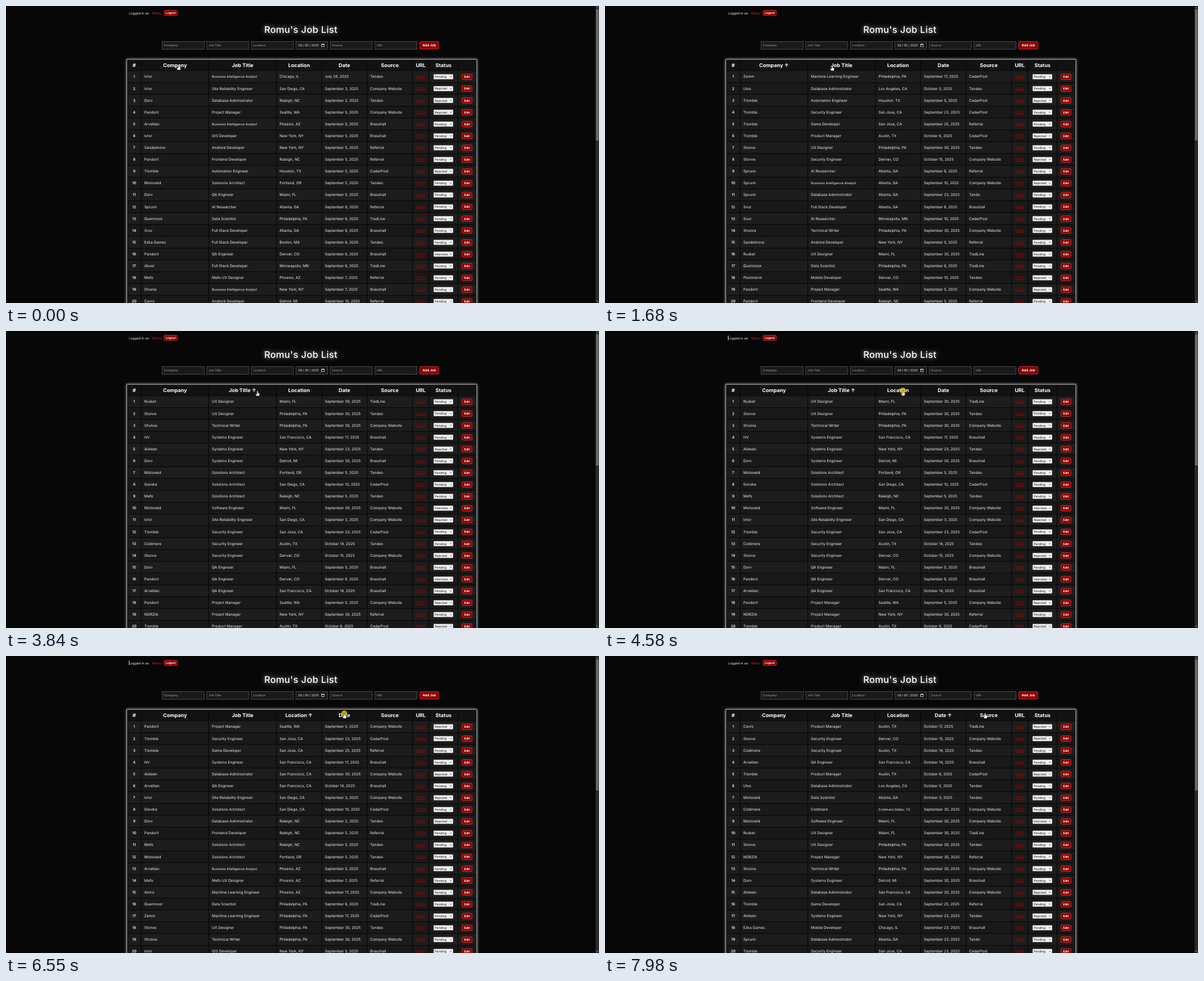
Recreate the animation shown at these times as an HTML page. Size 1057 by 530 pixels, loop 8000 ms.

```html
<!DOCTYPE html>
<html lang="en">
<head>
<title>Job List</title>
<style>
  html, body { margin: 0; width: 100%; height: 100%; overflow: hidden; background: #070707; }
  svg { display: block; width: 1057px; height: 530px; }
  text { font-family: Inter, sans-serif; text-rendering: geometricPrecision; fill: #f2f2f2; }
  .cell { font-size: 6.6px; }
  .num { font-size: 6.6px; font-weight: 600; }
  .small { font-size: 5.85px; }
  .head { font-size: 9.1px; font-weight: 700; fill: #fff; }
  .link { font-size: 6.9px; fill: #b80000; text-decoration: underline; }
  .state { font-size: 5.4px; fill: #111; }
  .btn { font-size: 5.3px; font-weight: 700; fill: #fff; }
  .hint { font-size: 5.5px; fill: #a0a0a0; }
  .title { font-size: 16.6px; font-weight: 500; letter-spacing: .3px; fill: #fff;
           filter: drop-shadow(0 0 4px rgba(255,255,255,.65)); }
  .glow { filter: drop-shadow(0 0 2px rgba(255,255,255,.7)); }
</style>
</head>
<body>
<svg id="stage" viewBox="0 0 1057 530"></svg>
<script>
const LOOP = 8000, ROWS = 20, PITCH = 21.1, FIRST = 126.1;
const EDGES = [216, 241, 361.5, 482, 562.7, 643.6, 724.6, 754, 805.6, 838.2];
const HEADS = ['#', 'Company', 'Job Title', 'Location', 'Date', 'Source', 'URL', 'Status', ''];
const MONTHS = { Jul: 'July', Sep: 'September', Oct: 'October' };
const STATES = { P: 'Pending', R: 'Rejected', I: 'Interview' };

const jobs = `Ivtor|Business Intelligence Analyst|Chicago, IL|Jul 28|Tandeo|P
Ivtor|Site Reliability Engineer|San Diego, CA|Sep 3|Company Website|R
Dorv|Database Administrator|Raleigh, NC|Sep 2|Tandeo|R
Pandoril|Project Manager|Seattle, WA|Sep 5|Company Website|R
Arvellian|Business Intelligence Analyst|Phoenix, AZ|Sep 5|Brasshall|P
Ivtor|iOS Developer|New York, NY|Sep 5|Brasshall|P
Sandelmore|Android Developer|New York, NY|Sep 5|Referral|P
Pandoril|Frontend Developer|Raleigh, NC|Sep 5|Referral|P
Tromble|Automation Engineer|Houston, TX|Sep 5|CedarPost|R
Mistoveld|Solutions Architect|Portland, OR|Sep 5|Tandeo|P
Dorv|QA Engineer|Miami, FL|Sep 5|Brasshall|P
Sprunn|AI Researcher|Atlanta, GA|Sep 6|Referral|P
Quenmoor|Data Scientist|Philadelphia, PA|Sep 6|TiedLine|P
Snur|Full Stack Developer|Atlanta, GA|Sep 6|Brasshall|P
Ezka Games|Full Stack Developer|Boston, MA|Sep 6|Tandeo|P
Pandoril|QA Engineer|Denver, CO|Sep 6|Brasshall|I
Abvel|Full Stack Developer|Minneapolis, MN|Sep 6|TiedLine|P
Mefo|Mefo UX Designer|Phoenix, AZ|Sep 7|Referral|P
Olvane|Business Intelligence Analyst|New York, NY|Sep 7|Brasshall|P
Cavro|Android Developer|Detroit, MI|Sep 10|Referral|P
Snur|AI Researcher|Minneapolis, MN|Sep 10|CedarPost|P
Sprunn|Business Intelligence Analyst|Atlanta, GA|Sep 10|Company Website|R
Plommerst|Mobile Developer|Denver, CO|Sep 10|Tandeo|R
Gondra|Solutions Architect|San Diego, CA|Sep 10|CedarPost|P
Zemm|Machine Learning Engineer|Philadelphia, PA|Sep 17|CedarPost|P
Mefo|Data Scientist|Boston, MA|Sep 17|CedarPost|P
HV|Systems Engineer|San Francisco, CA|Sep 17|Brasshall|P
Amrix|Machine Learning Engineer|Phoenix, AZ|Sep 17|Company Website|P
Aldwen|Systems Engineer|New York, NY|Sep 23|Tandeo|R
Ezka Games|Mobile Developer|Chicago, IL|Sep 23|Brasshall|P
Sprunn|Database Administrator|Atlanta, GA|Sep 23|Tando|P
Tromble|Security Engineer|San Jose, CA|Sep 23|CedarPost|P
Tromble|Game Developer|San Jose, CA|Sep 25|Referral|P
Coldmere|Coldmere|Coldmere Dallas, TX|Sep 30|Company Website|P
Mistoveld|Software Engineer|Miami, FL|Sep 30|Company Website|I
Rusket|UX Designer|Miami, FL|Sep 30|TiedLine|P
Stonve|UX Designer|Philadelphia, PA|Sep 30|Tandeo|P
NORZIA|Project Manager|New York, NY|Sep 30|Referral|P
Shulvia|Technical Writer|Philadelphia, PA|Sep 30|Company Website|P
Dorv|Systems Engineer|Detroit, MI|Sep 30|Brasshall|P
Aldwen|Database Administrator|San Francisco, CA|Sep 30|Company Website|R
Mistoveld|Data Scientist|Atlanta, GA|Oct 3|Tandeo|P
Ulvo|Database Administrator|Los Angeles, CA|Oct 5|Tandeo|P
Tromble|Product Manager|Austin, TX|Oct 6|CedarPost|R
Coldmere|Security Engineer|Austin, TX|Oct 14|Tandeo|P
Arvellian|QA Engineer|San Francisco, CA|Oct 14|Brasshall|P
Stonve|Security Engineer|Denver, CO|Oct 15|Company Website|R
Cavro|Product Manager|Austin, TX|Oct 17|TiedLine|R
Mefo|Solutions Architect|Raleigh, NC|Sep 5|Tandeo|P`.split('\n').map(line => {
  const f = line.split('|'), [month, day] = f[3].split(' ');
  return {
    fields: [f[0], f[1], f[2], `${MONTHS[month]} ${day}, 2025`, f[4], STATES[f[5]]],
    time: Date.parse(`${month} ${day}, 2025`)
  };
});

// Each click: press time, release time (sorts), column, direction.
const CLICKS = [
  [70, 200, 0, 1], [870, 1000, 0, -1], [2360, 2430, 1, 1], [3310, 3440, 1, -1],
  [4580, 4710, 2, 1], [5460, 5590, 2, -1], [6550, 6680, 3, 1], [7280, 7500, 3, -1]
];
// Pointer moves: start, steps, end x, end y, ease-out power.
const START = [307.5, 105];
const MOVES = [
  [1330, 10, 434, 107, 1.6], [3840, 7, 531, 106.4, 1.03],
  [5860, 7, 603, 102.4, 1.4], [7700, 5, 677.6, 102.2, 1.2]
];
const STEP = 70;
const CARET = [[70, 600], [870, 1400], [1960, 2850], [3310, 3840],
               [4380, 5110], [5460, 5950], [6550, 7080], [7280, 7770]];

const stage = document.getElementById('stage');

function add(tag, attrs, text) {
  const node = document.createElementNS('http://www.w3.org/2000/svg', tag);
  for (const k in attrs) node.setAttribute(k, attrs[k]);
  if (text !== undefined) node.textContent = text;
  stage.appendChild(node);
  return node;
}
const box = (x, y, width, height, fill, more) => add('rect', { x, y, width, height, fill, ...more });
const label = (cls, x, y, text, anchor = 'start') =>
  add('text', { class: cls, x, y, 'text-anchor': anchor }, text);

function button(x, y, w, h, text, size) {
  box(x, y, w, h, '#8b0000', { rx: 2, stroke: '#dc3a3a', 'stroke-width': .8 });
  const t = label('btn', x + w / 2, y + h / 2 + size * .36, text, 'middle');
  t.style.fontSize = size + 'px';
}

function input(x, w, hint) {
  box(x, 63.4, w, 13.8, '#1a1a1a', { stroke: '#5c5c5c', 'stroke-width': .8 });
  return label('hint', x + 3.2, 72.3, hint);
}

// Page header and form
label('cell', 219.3, 14.5, 'Logged in as:').style.fontSize = '5.8px';
const user = label('cell', 260.8, 14.5, 'Romu');
user.style.cssText = 'font-size:5.9px;fill:#d42a2a';
button(281.8, 7.6, 23.6, 9.2, 'Logout', 5.1);
label('title', 525.5, 48.4, "Romu's Job List", 'middle');
input(278.2, 75, 'Company');
input(357.8, 75, 'Job Title');
input(437.2, 75, 'Location');
const day = input(516.8, 56.6, '09 / 05 / 2025');
day.setAttribute('x', 521);
day.style.cssText = 'font-size:5.4px;fill:#f2f2f2';
box(562.6, 68.2, 4.6, 4.4, 'none', { stroke: '#eee', 'stroke-width': .7 });
box(562.6, 67.8, 4.6, 1.4, '#eee');
input(577.8, 75, 'Source');
input(657.4, 75, 'URL');
button(737.4, 63.5, 34.2, 13.4, 'Add Job', 5.9);

// Table frame, cells and header
box(215.4, 95.4, 623.6, 460, '#080808', { class: 'glow', stroke: '#8a8a8a', 'stroke-width': 1.3 });
const middle = i => (EDGES[i] + EDGES[i + 1]) / 2;
const heads = HEADS.map((text, i) => {
  const w = EDGES[i + 1] - EDGES[i] - 1.2;
  box(EDGES[i] + .6, 96.4, w, 19, '#121212');
  for (let r = 0; r < ROWS; r++)
    box(EDGES[i] + .6, FIRST - 9.9 + r * PITCH, w, 19.9, r % 2 ? '#191919' : '#1d1d1d');
  return label('head', middle(i), 109.3, text, 'middle');
});

const rows = Array.from({ length: ROWS }, (_, r) => {
  const y = FIRST + r * PITCH, base = y + 2.3;
  label('num', middle(0), base, r + 1, 'middle');
  const cells = [1, 2, 3, 4, 5].map(c => label('cell', EDGES[c] + 5.5, base, ''));
  label('link', middle(6), base + .1, 'Click', 'middle');
  box(762.2, y - 4.3, 34.8, 9, '#efefef', { rx: 1, stroke: '#777', 'stroke-width': .5 });
  cells.push(label('state', 764.2, y + 2.2, ''));
  add('path', { d: `M791.4 ${y - .5}l1.4 1.4l1.4-1.4`, fill: 'none', stroke: '#111', 'stroke-width': .7 });
  button(812.7, y - 4.8, 18, 10.2, 'Edit', 5.3);
  return cells;
});

// Scrollbar
box(1051, 0, 6, 530, '#2a2a2a');
box(1051.6, 6, 4.8, 234, '#6a6a6a');
add('path', { d: 'M1052.4 4l1.6-2l1.6 2zM1052.4 526l1.6 2l1.6-2z', fill: '#8a8a8a' });

// Caret and pointer
const caret = box(219.1, 8, .9, 8.4, '#e8e8e8');
const ring = add('circle', { r: 5.3, fill: '#e0d000', 'fill-opacity': .78 });
const hand = add('path', {
  d: 'M-1 .6Q0-1 1 .6V3.5L3.4 4.2Q4.1 4.6 3.9 5.9L3 9.2H-1.4L-3.6 5.6Q-3.5 4.2-2.3 5L-1 6Z',
  fill: '#fff', stroke: '#000', 'stroke-width': .5
});

function sorted(col, dir) {
  const compare = col === 3
    ? (a, b) => a.time - b.time
    : (a, b) => a.fields[col].localeCompare(b.fields[col], 'en');
  return jobs.slice().sort((a, b) => dir * compare(a, b));
}

function fillTable(click) {
  const list = click ? sorted(click[2], click[3]) : jobs;
  heads.forEach((h, i) => {
    const arrow = click && click[2] === i - 1 ? (click[3] > 0 ? ' \u2193' : ' \u2191') : '';
    h.textContent = HEADS[i] + arrow;
  });
  rows.forEach((cells, r) => cells.forEach((cell, c) => {
    const text = list[r].fields[c];
    cell.textContent = text;
    const tight = (c === 1 && text.length > 25) || (c === 2 && text.length > 17);
    cell.classList.toggle('small', tight);
  }));
}

function pointer(t) {
  let [x, y] = START;
  for (const [start, steps, endX, endY, power] of MOVES) {
    if (t < start) break;
    const p = Math.min(1, (Math.floor((t - start) / STEP) + 1) / steps);
    const e = 1 - (1 - p) ** power;
    x += (endX - x) * e;
    y += (endY - y) * e;
  }
  return [x, y];
}

const show = (node, on) => node.setAttribute('visibility', on ? 'visible' : 'hidden');
const within = (t, spans) => spans.some(([a, b]) => t >= a && t < b);
let shown;

function draw(t) {
  const current = CLICKS.filter(c => t >= c[1]).pop() || null;
  if (current !== shown) fillTable(shown = current);
  const place = `translate(${pointer(t).join(' ')})`;
  hand.setAttribute('transform', place);
  ring.setAttribute('transform', place);
  show(ring, within(t, CLICKS));
  show(caret, within(t, CARET));
}

const began = performance.now();
function tick() {
  draw((performance.now() - began) % LOOP);
  requestAnimationFrame(tick);
}
tick();
</script>
</body>
</html>
```
